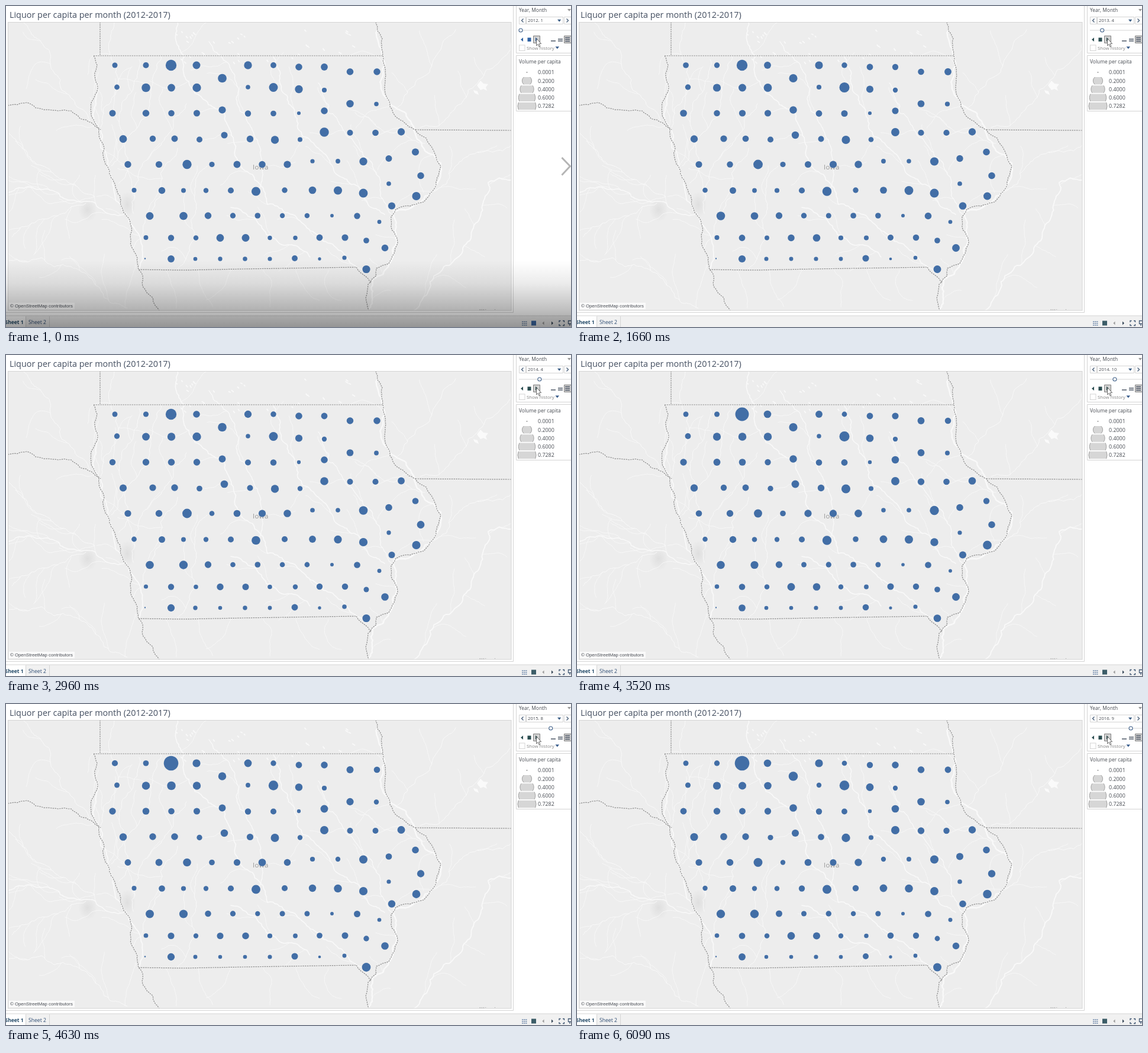
An HTML page for the animation above (6140 ms loop, 955 by 542 pixels).

```html
<!DOCTYPE html>
<html lang="en">
<head>
<meta charset="utf-8">
<title>Liquor per capita</title>
<style>
  html, body { margin: 0; width: 100%; height: 100%; overflow: hidden; background: #fff; }
  svg { display: block; width: 955px; height: 542px; fill: #474b52; }
  text { font-family: "Open Sans", "Noto Sans", sans-serif; }
  .arial { font-family: "Liberation Sans", Arial, sans-serif; }
  .line { fill: none; stroke: #d4d4d4; }
  .pen { fill: none; stroke: #435a76; stroke-width: 1.3; }
</style>
</head>
<body>
<svg viewBox="0 0 955 542">
  <defs>
    <clipPath id="mapClip"><rect x="3" y="27" width="851" height="487"/></clipPath>
    <linearGradient id="shade" x1="0" y1="0" x2="0" y2="1">
      <stop offset="0" stop-color="#000" stop-opacity="0"/>
      <stop offset=".35" stop-color="#000" stop-opacity=".08"/>
      <stop offset=".7" stop-color="#000" stop-opacity=".23"/>
      <stop offset="1" stop-color="#000" stop-opacity=".38"/>
    </linearGradient>
    <radialGradient id="town">
      <stop offset="0" stop-color="#dfdfdf"/>
      <stop offset="1" stop-color="#dfdfdf" stop-opacity="0"/>
    </radialGradient>
  </defs>

  <rect width="955" height="542" fill="#fff"/>
  <text x="6" y="20" font-size="14.4" fill="#434e60">Liquor per capita per month (2012-2017)</text>

  <g clip-path="url(#mapClip)">
    <rect x="3" y="27" width="851" height="487" fill="#ededed"/>
    <ellipse cx="138" cy="344" rx="16" ry="20" fill="url(#town)"/>
    <ellipse cx="205" cy="335" rx="14" ry="22" fill="url(#town)"/>
    <g id="rivers" fill="none" stroke="#f9f9f9" stroke-linejoin="round" stroke-linecap="round"></g>
    <path d="M796 134l6-8 5 5 8 1-4 5 2 6-6-3-5 2zM790 142l7 2 2 6-7-3z" fill="#fafafa"/>
    <g id="borders" fill="none" stroke="#8f8f8f" stroke-width="1.2" stroke-dasharray="2.4 1.4"></g>
    <text x="417" y="276" font-size="11.5" letter-spacing=".4" fill="#999">Iowa</text>
    <text x="800" y="519" font-size="8.5" letter-spacing="1" fill="#777">Illinois</text>
    <g id="dots" fill="#426ea6"></g>
    <rect x="5" y="501" width="111" height="11" fill="#fafafa"/>
    <text class="arial" x="7" y="509.3" font-size="7.8">© OpenStreetMap contributors</text>
  </g>
  <rect class="line" x="3.5" y="27.5" width="850.5" height="486.5" stroke="#dedede"/>
  <path class="line" d="M857.5 0V517.5H0"/>

  <path class="line" d="M955 79.5H862.5V0M955 83.5H862.5V177.5H955"/>
  <text x="867" y="10" font-size="8.4">Year, Month</text>
  <path d="M949 5h6l-3 4z" fill="#999"/>
  <path class="line" d="M867.5 18.5h11v12h-11zM879.5 18.5h62v12h-62zM955 18.5h-11.500v12h11.500"/>
  <path class="pen" d="M874.5 21.5l-3 3 3 3M947.5 21.5l3 3-3 3"/>
  <text id="month" x="882" y="27.4" font-size="7.7"></text>
  <path d="M932 22.7h6.4l-3.2 4z" fill="#3c5f86"/>
  <path class="line" d="M867 41H955"/>
  <circle id="knob" cy="41" r="3" fill="#fff" stroke="#44648c" stroke-width="1.1"/>
  <path d="M891.5 50.5h11v12h-11zM943.5 50.5h12v12h-12z" fill="#d2d2d2" stroke="#808080"/>
  <path id="controls" d="M874 53.3v6.800l-4-3.4zM881.5 53.5h6v6.5h-6zM895 53v7l4-3.5z"/>
  <path d="M921 59h8M933 56h8M933 59h8M945 53.5h8M945 56.5h8M945 59.5h8" stroke="#4b5664" stroke-width="1.7"/>
  <rect class="line" x="867.5" y="66" width="9.5" height="9.5"/>
  <text x="880" y="73.5" font-size="7.8" fill="#858585">Show history</text>
  <path d="M928.5 68.5h6.6l-3.3 4z" fill="#35598a"/>
  <path d="M896.5 55v12l2.7-2.5 2 4.5 1.8-.8-2-4.4 3.7-.2z" fill="#fff" stroke="#444" stroke-width=".8"/>
  <text x="867" y="97.4" font-size="8.4">Volume per capita</text>
  <g id="legend"></g>

  <rect y="523" width="955" height="19" fill="#f1f1f1"/>
  <rect y="523" width="33" height="19" fill="#fff"/>
  <path class="line" d="M33.5 524V542M73.5 524V542M0 523H955" stroke="#e0e0e0"/>
  <text x="-1.5" y="536.5" font-size="8.5" font-weight="700" fill="#234a68">Sheet 1</text>
  <text x="38" y="536.5" font-size="8.65" fill="#2c4b72">Sheet 2</text>
  <path d="M872 533h8.5M872 536h8.5M872 539h8.5" stroke="#8fa3bd" stroke-width="2" stroke-dasharray="2.3 .8"/>
  <rect id="sheetIcon" x="888" y="531.5" width="8" height="8"/>
  <path d="M909.5 532.5v6l-3-3z" fill="#999"/>
  <path d="M922 532.5v6l3-3z" fill="#345"/>
  <path class="pen" d="M935 534v-2.5h2.5M941 531.5h2.5v2.5M943.5 537v2.5h-2.5M937.5 539.5h-2.5v-2.5M956 531.5h-5.5v5h5M953 537v3"/>

  <g id="overlay">
    <rect y="430" width="955" height="112" fill="url(#shade)"/>
    <path d="M939.5 256l14 14.5-14 15" fill="none" stroke="#b5b5b5" stroke-width="3"/>
  </g>
</svg>
<script>
const LOOP = 6140;
const $ = id => document.getElementById(id);

function add(parent, tag, attrs) {
  const el = document.createElementNS('http://www.w3.org/2000/svg', tag);
  for (const key in attrs) el.setAttribute(key, attrs[key]);
  return parent.appendChild(el);
}

// Repeatable value in 0..1
function hash(a, b) {
  const v = Math.sin(a * 127.1 + b * 311.7) * 43758.5453;
  return v - Math.floor(v);
}
let draws = 0;
const random = (low, high) => low + (high - low) * hash(++draws, 5);

const toPath = points => 'M' + points.map(p => p.map(v => v.toFixed(1)).join(' ')).join('L');

// Natural-looking course through a few key points, by midpoint displacement
function meander(text, roughness) {
  const keys = text.split(' ').map(pair => pair.split(',').map(Number));
  const course = [keys[0]];
  function divide([ax, ay], [bx, by]) {
    const dx = bx - ax, dy = by - ay;
    if (Math.hypot(dx, dy) < 6) return course.push([bx, by]);
    const off = random(-roughness, roughness);
    const middle = [(ax + bx) / 2 - dy * off, (ay + by) / 2 + dx * off];
    divide([ax, ay], middle);
    divide(middle, [bx, by]);
  }
  for (let i = 1; i < keys.length; i++) divide(keys[i - 1], keys[i]);
  return course;
}

function border(text, roughness = 0) {
  add($('borders'), 'path', { d: toPath(meander(text, roughness)) });
}

// Small stream wandering upstream from a point
function stream(point, heading, length) {
  let [x, y] = point;
  const course = [point];
  for (let gone = 0; gone < length; gone += 4) {
    heading += random(-.35, .35);
    course.push([x += 4 * Math.cos(heading), y += 4 * Math.sin(heading)]);
  }
  add($('rivers'), 'path', { d: toPath(course), 'stroke-width': .8 });
}

function river(width, text, spacing = 14) {
  const course = meander(text, .16);
  add($('rivers'), 'path', { d: toPath(course), 'stroke-width': width });
  for (let i = spacing; i < course.length; i += spacing) {
    const [x0, y0] = course[i - 1], [x1, y1] = course[i];
    const side = hash(i, width) < .5 ? -1 : 1;
    stream(course[i], Math.atan2(y0 - y1, x0 - x1) + side * random(.5, .9), random(25, 80));
  }
}

// Western plains
river(1.5, '3,315 48,308 98,325 132,330 203,350', 5);
river(1, '5,215 62,270 110,300 150,322', 7);
river(1, '10,390 50,365 100,350 135,333', 7);
river(1, '5,430 60,425 110,440 160,480 205,510', 9);
river(1, '30,27 80,110 120,170 150,203');
river(1, '183,27 178,90 160,205');
// Inside the state
river(1, '225,90 206,150 178,270');
river(1, '262,84 245,150 190,300');
river(1, '305,165 275,215 215,350');
river(1.6, '290,27 302,84 338,160 374,200 400,275 442,335 500,366 552,402 608,452');
river(1.3, '343,60 392,150 412,200 425,312');
river(1.5, '452,84 492,190 528,240 570,290 640,352');
river(1.2, '528,130 545,180 616,262 652,352');
river(1, '590,180 630,205 708,232');
river(1.6, '380,340 420,358 470,404 514,424', 9);
river(1, '290,240 262,300 232,370 215,410');
river(1, '340,270 320,330 290,446');
// Great river and the east
river(2.4, '628,40 637,84 652,168 690,206 735,265 724,308 655,346 660,400 620,462 612,514');
river(1.8, '154,130 147,185 180,292 207,360 224,445');
river(1, '760,40 716,112 655,178');
river(1, '854,62 800,125 770,165 700,205');
river(1, '854,235 788,250 745,300 718,316');
river(1.8, '854,294 815,298 800,360 786,392 740,440 690,514', 9);
// Southern creeks
for (let x = 270; x < 600; x += 55) stream([x, 446], random(1, 1.7), 65);
// Northern lakes
for (let i = 0; i < 36; i++) {
  const x = random(255, 415) + (i % 3 ? 0 : 180), y = random(35, 95);
  add($('rivers'), 'path', { d: `M${x} ${y}l${random(1, 4)} ${random(1, 3)}`, 'stroke-width': 1.8 });
}

border('159,27 159,84');
border('148,84 638,84');
border('224,445 300,446 400,444 592,441');
border('692,209 854,210');
border('148,84 154,100 150,118 154,145 144,180 157,209 166,240 165,256 184,300 194,328 207,358 211,395 224,445 232,475 259,514', .12);
border('592,441 600,451 617,468', .1);
border('625,27 637,84 642,117 640,138 654,180 692,209 722,243 735,270 727,302 706,331 659,343 651,355 662,400 647,435 626,443 626,455 612,470 613,514', .1);
border('3,168 35,163 50,172 88,177 110,177 125,190 160,209', .1);

// Counties stand in rows: each run is evenly spaced and of one typical size
const counties = [];
function run(r, x, y, count = 1, step = 43) {
  for (let i = 0; i < count; i++) {
    counties.push({ r, el: add($('dots'), 'circle', { cx: x + i * step, cy: y }) });
  }
}
run(4.8, 184, 100, 2, 52.5);
run(9.2, 279, 100);
run(6.2, 322, 100);
run(7.3, 365.5, 122);
run(6.2, 409, 100);
run(4.6, 452, 100);
run(5.5, 495, 103, 2);
run(5.6, 581.5, 111, 2, 45.5);

run(4.6, 187.5, 137);
run(6.8, 236.5, 138, 3);
run(4, 409, 137);
run(8, 452, 137.5);
run(6.2, 495, 140.5);
run(4.3, 538, 142);
run(6, 581.5, 165);
run(4, 626, 165.5);

run(5.6, 180, 181);
run(5.5, 236.5, 181, 3);
run(6, 365.5, 175.5);
run(5.2, 409, 181.5, 2);
run(3.3, 495, 181);
run(6, 538, 177);

run(6.3, 198, 224.5);
run(5.6, 248, 224, 2, 37);
run(4.8, 327, 225.5);
run(6, 369, 218);
run(5.3, 412.5, 224.5);
run(7.2, 454.5, 226);
run(4.1, 497, 225.5);
run(7.3, 538, 213);
run(5.3, 581.5, 214, 2);
run(6.4, 668, 212.5);

run(5.6, 206, 267.5, 2, 52.5);
run(7.4, 306, 267.5);
run(4.5, 348, 267.5);
run(6, 390.5, 267.5, 3, 42.5);
run(3.9, 518, 262, 2);
run(7.2, 604, 262.5);
run(5.6, 647, 257.5);
run(5.6, 692, 246.5);
run(6, 701, 286.5);

run(4.3, 216.5, 311);
run(5.8, 263.5, 311.5);
run(4, 300, 311.5, 2, 38);
run(5, 380, 311.5);
run(7.3, 422.5, 313);
run(5, 471, 311);
run(6, 518, 311);
run(6.9, 561, 311.5);
run(7.2, 604, 316);
run(3.6, 647, 300);
run(6.9, 693.5, 321);

run(6.8, 243, 354.5, 2, 57);
run(5.4, 341.5, 354);
run(4.5, 383.5, 354, 4, 41.8);
run(2.8, 551, 354);
run(5.4, 593.5, 354.5);
run(5.9, 652, 337.5);
run(3.2, 631, 364.5);

run(3.7, 236.5, 391);
run(5.3, 279, 391.5);
run(4, 321, 391.5);
run(6, 362, 391.5, 2);
run(4, 446, 391.5, 2);
run(5.2, 530, 391, 2);
run(4.7, 609, 396);
run(6.300, 640.5, 408.5);

run(1.2, 235, 426.5);
run(5.9, 279, 427);
run(3.5, 320, 427, 4, 42);
run(5.200, 488, 426);
run(2.5, 530, 427);
run(3.6, 572, 425);
run(6.9, 609, 444.5);

const lakeCounty = 2;
function radius(i, month) {
  if (i === lakeCounty) {
    return counties[i].r + 3.2 * Math.max(0, Math.sin((month % 12 - 4.5) * Math.PI / 6));
  }
  return counties[i].r * (1 + (hash(i + 1, month + 1) - .5) * .16);
}

// Legend: circles growing by area, cropped to the row height
add($('legend'), 'circle', { cx: 880.5, cy: 112, r: .9, fill: '#888' });
[.0001, .2, .4, .6, .7282].forEach((value, i) => {
  const cy = 112 + i * 14.25;
  add($('legend'), 'text', { x: 899, y: cy + 3.3, 'font-size': 8.9 }).textContent = value.toFixed(4);
  if (!i) return;
  const r = 18.2 * Math.sqrt(value), h = 6.2, w = Math.sqrt(r * r - h * h);
  const left = 880.5 - w, right = 880.5 + w;
  const arc = `A${r} ${r} 0 0 1`;
  const shape = `M${right} ${cy - h}${arc} ${right} ${cy + h}`;
  add($('legend'), 'path', { d: `${shape}H${left}${arc} ${left} ${cy - h}Z`, fill: '#d6d6d6' });
  add($('legend'), 'path', {
    d: `${shape}M${left} ${cy + h}${arc} ${left} ${cy - h}`, fill: 'none', stroke: '#a0a0a0'
  });
});

function render(t) {
  const month = Math.floor(t * .0093 + .26);
  $('month').textContent = `${2012 + Math.floor(month / 12)}. ${month % 12 + 1}`;
  $('knob').setAttribute('cx', 870 + month * 1.18);
  counties.forEach((county, i) => county.el.setAttribute('r', radius(i, month)));
  const early = t < 640;
  $('controls').setAttribute('fill', early ? '#2f62a3' : '#2b4d50');
  $('sheetIcon').setAttribute('fill', early ? '#3d6ba8' : '#3c5d68');
  $('overlay').setAttribute('opacity', Math.max(0, Math.min(1, 1 - (t - 40) / 260)));
}

const begin = performance.now();
function tick() {
  render((performance.now() - begin) % LOOP);
  requestAnimationFrame(tick);
}
render(0);
requestAnimationFrame(tick);
</script>
</body>
</html>
```
